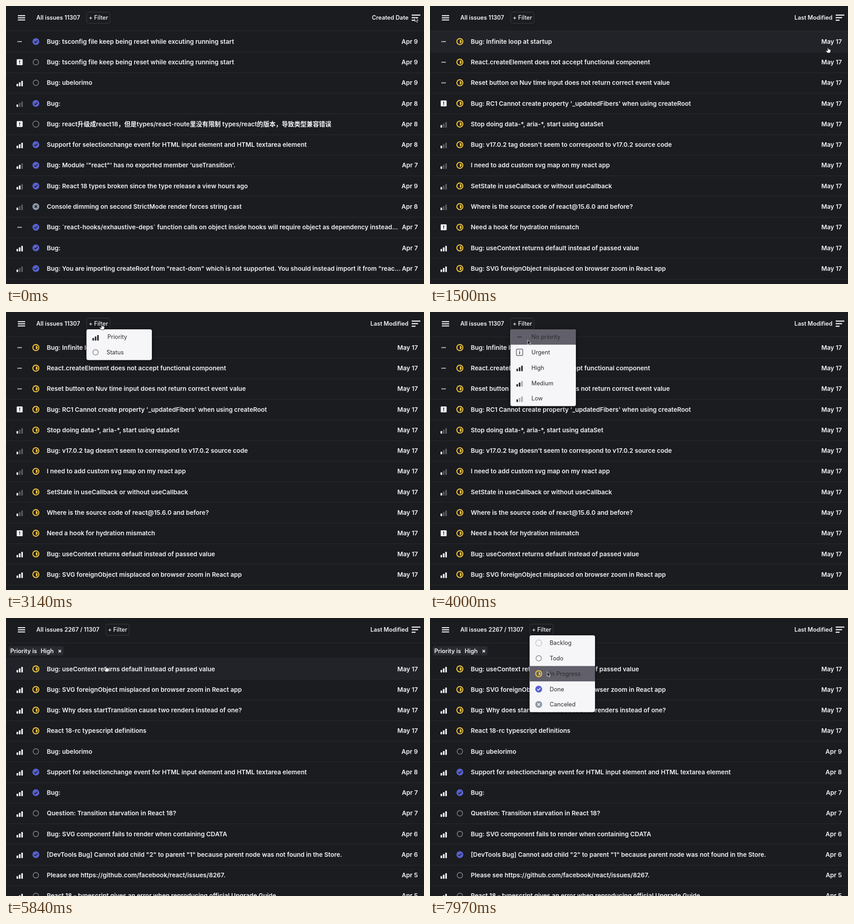
Animation, 917 px wide and 610 px high, one loop 8 s. Source, as an HTML page:

```html
<!DOCTYPE html>
<html lang="en">
<head>
<meta charset="utf-8">
<title>Issue list</title>
<style>
  html, body { margin: 0; width: 100%; height: 100%; overflow: hidden; background: #1b1c20; }
  svg { display: block; }
  text { font: 600 12.7px Inter, "Noto Sans CJK SC", "Noto Sans CJK", sans-serif; fill: #f4f4f6; white-space: pre; }
  .row text { font-size: 13.6px; }
  .menu text { font-weight: 400; fill: #2b2b30; }
  .plain { font-weight: 500; }
  .end { text-anchor: end; }
</style>
</head>
<body>
<svg id="stage" width="917" height="610" viewBox="0 0 917 610"></svg>
<script>
const LOOP = 8000, ROW = 45.27, ITEM = 33.7, MENU_WIDTH = 143.5, MENU_TOP = 38;
const stage = document.getElementById('stage');

const rect = (x, y, w, h, fill, extra = '') =>
  `<rect x="${x}" y="${y}" width="${w}" height="${h}" fill="${fill}" ${extra}/>`;
const text = (x, y, s, cls = '') => `<text x="${x}" y="${y}" class="${cls}">${s}</text>`;
const at = (x, y, content) => `<g transform="translate(${x} ${y})">${content}</g>`;
const group = (id, content, cls = '') => `<g id="${id}" class="${cls}">${content}</g>`;

// Icons are centred on 0,0.
const bars = (count, on, off) => [0, 1, 2].map(i =>
  rect(-6.9 + i * 5.2, 2.2 - i * 3.3, 3.5, 5.6 + i * 3.3, i < count ? on : off, 'rx="1"')).join('');
const dots = color => [-4.7, -1.4, 1.9].map(x => rect(x, -1, 2.4, 2.2, color, 'rx=".7"')).join('');
const ring = (color, extra = '') =>
  `<circle r="6" fill="none" stroke="${color}" stroke-width="1.5" ${extra}/>`;
const disc = (color, mark, markColor) =>
  `<circle r="7.5" fill="${color}"/><path d="${mark}" fill="none" stroke="${markColor}" stroke-width="1.7"/>`;

const priorityIcon = (key, light) => {
  const on = light ? '#2b2b30' : '#f2f2f4', off = light ? '#acacb2' : '#5b5c61';
  if (key === 'n') return dots(on);
  if (key === 'u') return light
    ? rect(-7, -7, 14, 14, 'none', 'rx="2" stroke="#5c5c64" stroke-width="1.4"')
      + rect(-.8, -4, 1.6, 1.7, on) + rect(-.8, -1, 1.6, 5, on)
    : rect(-6.5, -6.5, 13, 13, on, 'rx="1.5"')
      + rect(-.9, -3.8, 1.8, 4.6, '#1b1c20') + rect(-.9, 2, 1.8, 1.8, '#1b1c20');
  return bars('lmh'.indexOf(key) + 1, on, off);
};
const statusIcon = (key, light) => {
  const cut = light ? '#f6f6f8' : '#1b1c20';
  return {
    b: `<circle r="6.7" fill="none" stroke="${light ? '#a5a5ab' : '#c4c5ca'}" stroke-width="1.8" pathLength="28" stroke-dasharray="1"/>`,
    t: ring('#86878d'),
    p: '<circle r="6.6" fill="none" stroke="#f0c440" stroke-width="2.2"/><path d="M0-3.8a3.8 3.8 0 0 1 0 7.6z" fill="#f0c440"/>',
    d: disc('#5860cf', 'M-3.4 .2L-1 2.6L3.6-2.4', cut),
    c: disc('#8d98a8', 'M-2.7-2.7L2.7 2.7M2.7-2.7L-2.7 2.7', cut),
  }[key];
};

// Each line: priority and status keys, date, title.
const created = `nd|Apr 9|Bug: tsconfig file keep being reset while excuting running start
ut|Apr 9|Bug: tsconfig file keep being reset while excuting running start
ht|Apr 9|Bug: ubelorimo
ld|Apr 8|Bug:
ub|Apr 8|Bug: react升级成react18，但是types/react-route里没有限制 types/react的版本，导致类型兼容错误
hd|Apr 8|Support for selectionchange event for HTML input element and HTML textarea element
md|Apr 7|Bug: Module '"react"' has no exported member 'useTransition'.
md|Apr 9|Bug: React 18 types broken since the type release a view hours ago
lc|Apr 8|Console dimming on second StrictMode render forces string cast
nd|Apr 7|Bug: \`react-hooks/exhaustive-deps\` function calls on object inside hooks will require object as dependency instead...
hd|Apr 7|Bug:
ld|Apr 7|Bug: You are importing createRoot from "react-dom" which is not supported. You should instead import it from "reac...`;
const modified = `np|May 17|Bug: Infinite loop at startup
np|May 17|React.createElement does not accept functional component
np|May 17|Reset button on Nuv time input does not return correct event value
up|May 17|Bug: RC1 Cannot create property '_updatedFibers' when using createRoot
lp|May 17|Stop doing data-*, aria-*, start using dataSet
lp|May 17|Bug: v17.0.2 tag doesn't seem to correspond to v17.0.2 source code
lp|May 17|I need to add custom svg map on my react app
lp|May 17|SetState in useCallback or without useCallback
lp|May 17|Where is the source code of react@15.6.0 and before?
up|May 17|Need a hook for hydration mismatch
hp|May 17|Bug: useContext returns default instead of passed value
hp|May 17|Bug: SVG foreignObject misplaced on browser zoom in React app`;
const filtered = `hp|May 17|Bug: useContext returns default instead of passed value
hp|May 17|Bug: SVG foreignObject misplaced on browser zoom in React app
hp|May 17|Bug: Why does startTransition cause two renders instead of one?
hp|May 17|React 18-rc typescript definitions
ht|Apr 9|Bug: ubelorimo
hd|Apr 8|Support for selectionchange event for HTML input element and HTML textarea element
hd|Apr 7|Bug:
ht|Apr 7|Question: Transition starvation in React 18?
ht|Apr 6|Bug: SVG component fails to render when containing CDATA
hd|Apr 6|[DevTools Bug] Cannot add child "2" to parent "1" because parent node was not found in the Store.
ht|Apr 5|Please see https://github.com/facebook/react/issues/8267.
ht|Apr 5|React 18 - typescript gives an error when reproducing official Upgrade Guide`;

const list = (id, source, top) => group(id, source.split('\n').map((line, i) => {
  const [keys, date, title] = line.split('|');
  const y = top + 23 + i * ROW;
  return at(30, y, priorityIcon(keys[0])) + at(65.5, y, statusIcon(keys[1]))
    + text(89.5, y + 4.8, title) + text(903.5, y + 4.8, date, 'end')
    + rect(0, Math.round(y + 22.6), 917, 1, '#292a2e');
}).join(''), 'row');

const header = (id, title, filterX) => group(id,
  text(66.5, 30.4, title)
  + rect(filterX + .5, 13.5, 51, 24.5, 'none', 'rx="4" stroke="#55565b" stroke-dasharray="2 1.5"')
  + text(filterX + 5, 30.4, '+ Filter', 'plain'));

// Items: icon markup, label, label offset.
const menu = (id, x, items) => group(id,
  rect(x, MENU_TOP, MENU_WIDTH, items.length * ITEM, '#f6f6f8',
    'rx="4" style="filter:drop-shadow(0 2px 5px #0008)"')
  + rect(x, MENU_TOP, MENU_WIDTH, ITEM, '#605f6a', 'class="hover"')
  + items.map(([icon, label, offset], i) => {
      const y = MENU_TOP + ITEM * (i + .5);
      return at(x + 20, y, icon) + text(x + offset, y + 4.6, label);
    }).join(''), 'menu');

const fields = [[priorityIcon('h', true), 'Priority', 46], [statusIcon('t', true), 'Status', 44]];
const priorities = ['No priority', 'Urgent', 'High', 'Medium', 'Low']
  .map((label, i) => [priorityIcon('nuhml'[i], true), label, 46]);
const statuses = ['Backlog', 'Todo', 'In Progress', 'Done', 'Canceled']
  .map((label, i) => [statusIcon('btpdc'[i], true), label, 44]);
const orders = ['Created Date', 'Last Modified', 'Status', 'Priority'].map(label => ['', label, 15]);

const chips = group('chips',
  rect(6, 62, 64.5, 20, '#2a2b30', 'rx="3"') + rect(71.5, 62, 37.5, 20, '#2a2b30')
  + rect(110, 62, 16, 20, '#2a2b30', 'rx="3"')
  + text(9.5, 76.5, 'Priority is') + text(76, 76.5, 'High')
  + '<path d="M115.3 70l5.4 5.4m0-5.4l-5.4 5.4" stroke="#f4f4f6" stroke-width="1.7"/>'
  + rect(0, 88, 917, 1, '#292a2e'));

const cursors =
  group('arrow', '<path d="M0 0V10.2L2.4 8L4 11.8L5.9 11L4.3 7.3H7.4Z" fill="#111" stroke="#f4f4f4" stroke-width=".9"/>')
  + group('hand', '<path d="M-1 .8Q0-.6 1 .8V4Q2 3.2 2.8 4.2Q3.8 3.4 4.5 4.5Q6 4 6 5.5V8.3L4.8 12H-1.5L-4.6 7.6Q-4.5 5.8-2.8 6.7L-1 8Z" fill="#f4f4f4" stroke="#111" stroke-width=".8"/>');

stage.innerHTML = rect(0, 0, 917, 610, '#1b1c20') + rect(0, 55, 917, 46, '#222328', 'id="rowHover"')
  + rect(0, 54, 917, 1, '#292a2e')
  + [20.1, 24.8, 29.5].map(y => rect(26, y, 16, 2.2, '#f2f2f4')).join('')
  + header('headAll', 'All issues 11307', 176.5) + header('headSome', 'All issues 2267 / 11307', 218.5)
  + text(883, 30.4, 'Created Date', 'end createdLabel') + text(883, 30.4, 'Last Modified', 'end modifiedLabel')
  + [[18.8, 19], [24.4, 14], [30, 8.5]].map(([y, w]) => rect(890, y, w, 2.4, '#f2f2f4')).join('')
  + list('created', created, 55) + list('modified', modified, 55)
  + chips + list('filtered', filtered, 88.7)
  + menu('sortMenu', 769.5, orders) + menu('fieldMenu', 176.5, fields)
  + menu('priorityMenu', 176.5, priorities) + menu('fieldMenu2', 218.5, fields)
  + menu('statusMenu', 218.5, statuses) + cursors;

const $ = selector => stage.querySelector(selector);
const show = (selector, on) => { $(selector).style.display = on ? '' : 'none'; };

const SORTED = 1200, FILTERED = 5550;
const menuTimes = [
  ['sortMenu', 450, SORTED], ['fieldMenu', 3000, 3950], ['priorityMenu', 3950, FILTERED],
  ['fieldMenu2', 6450, 7400], ['statusMenu', 7400, LOOP],
];
// Cursor stops: time, x, y.
const path = [
  [0, 897, 24], [520, 897, 24], [950, 876, 82], [1200, 873, 91], [1530, 873, 91], [1690, 835, 88],
  [2520, 335, 76], [2900, 210, 27], [3350, 210, 27], [3650, 214, 60], [4200, 214, 62],
  [4840, 213.5, 66], [5040, 214, 68], [5380, 219, 116], [5600, 219, 114], [5840, 219.5, 106],
  [5900, 220, 104], [6260, 244, 26], [6720, 244, 27], [6970, 247.5, 68], [7260, 252, 85],
  [7540, 253, 90], [7970, 257, 118], [LOOP, 257, 118],
];

function cursorAt(t) {
  const i = path.findIndex(stop => stop[0] > t);
  const [t0, x0, y0] = path[i - 1], [t1, x1, y1] = path[i];
  const u = (t - t0) / (t1 - t0), k = u * u * (3 - 2 * u);
  return [x0 + (x1 - x0) * k, y0 + (y1 - y0) * k];
}

function draw(t) {
  const [x, y] = cursorAt(t);
  const sorted = t >= SORTED, narrowed = t >= FILTERED;
  show('#created', !sorted);
  show('#modified', sorted && !narrowed);
  show('#filtered', narrowed);
  show('#chips', narrowed);
  show('#headAll', !narrowed);
  show('#headSome', narrowed);
  show('.createdLabel', !sorted);
  show('.modifiedLabel', sorted);

  let overMenu = false;
  for (const [id, from, to] of menuTimes) {
    const open = t >= from && t < to;
    show('#' + id, open);
    const inside = open && y >= MENU_TOP;
    overMenu ||= inside;
    const hover = $(`#${id} .hover`);
    hover.style.display = inside ? '' : 'none';
    if (inside) hover.setAttribute('y', MENU_TOP + Math.floor((y - MENU_TOP) / ITEM) * ITEM);
  }

  const top = narrowed ? 88.7 : 55;
  const overRow = !overMenu && y >= top;
  show('#rowHover', overRow);
  if (overRow) $('#rowHover').setAttribute('y', top + Math.floor((y - top) / ROW) * ROW);

  const pointing = overRow || (!overMenu && x < 300 && y < MENU_TOP);
  show('#hand', pointing);
  show('#arrow', !pointing);
  $(pointing ? '#hand' : '#arrow').setAttribute('transform', `translate(${x} ${y})`);
}

const start = performance.now();
function tick() {
  draw((performance.now() - start) % LOOP);
  requestAnimationFrame(tick);
}
tick();
</script>
</body>
</html>
```
